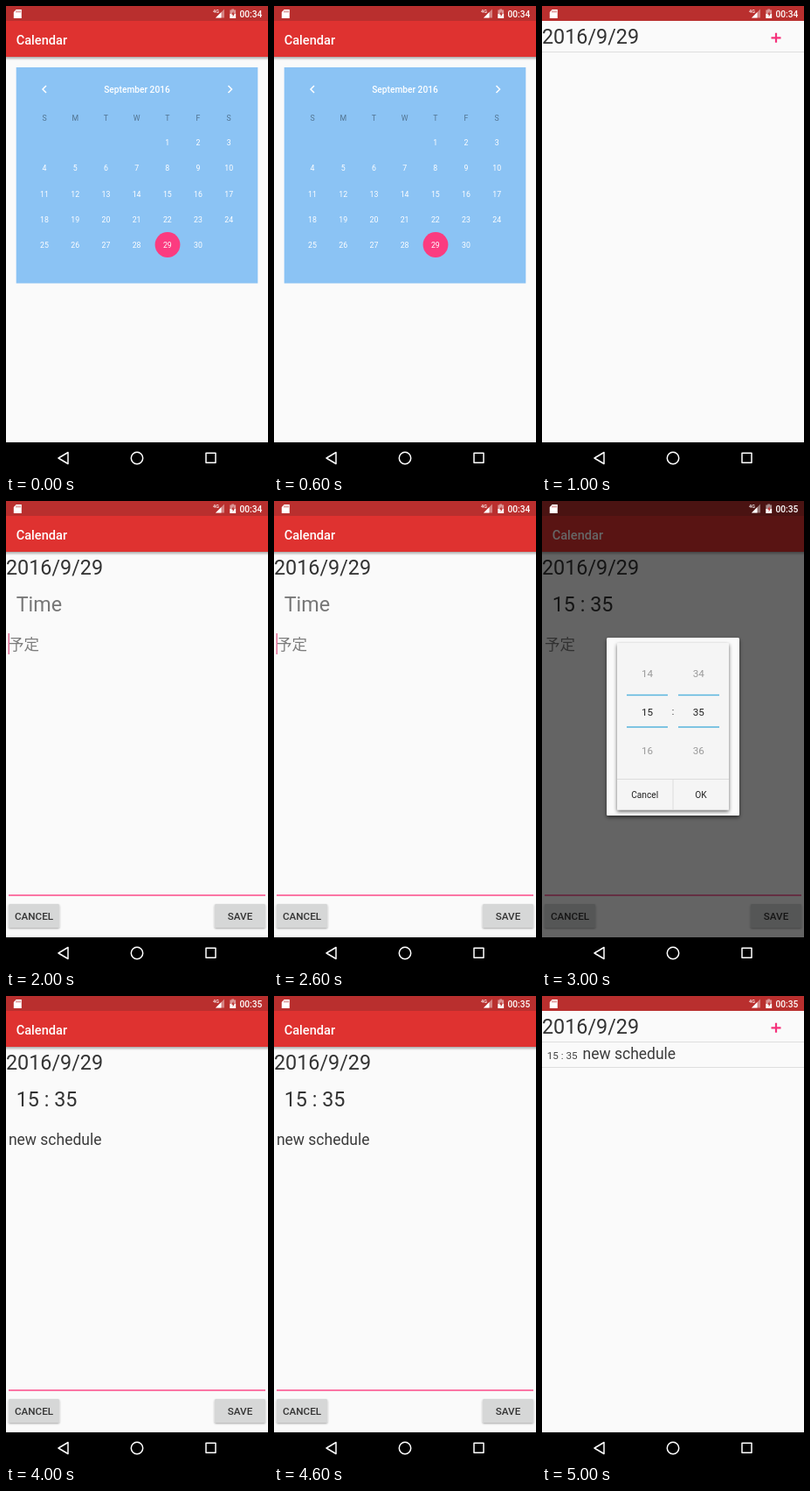
An HTML page for the animation above (6000 ms loop, 300x533 px).

```html
<!DOCTYPE html>
<html lang="en">
<head>
<meta charset="utf-8">
<title>Calendar</title>
<style>
  html, body { margin: 0; width: 100%; height: 100%; overflow: hidden; background: #fafafa; }
  svg { display: block; width: 100%; height: 100%; font-family: Roboto, "Noto Sans CJK JP", "Noto Sans CJK", sans-serif; }
  .medium { font-weight: 500; }
  .middle { text-anchor: middle; }
  .large { font-size: 23.33px; fill: #333; }
  .note { font-size: 17.5px; fill: #3c3c3c; }
  .line { fill: none; stroke: #fff; stroke-width: 1.5; }
</style>
</head>
<body>
<svg viewBox="0 0 300 533">
  <defs>
    <linearGradient id="fade" x2="0" y2="1">
      <stop stop-color="#000" stop-opacity=".32"/>
      <stop offset="1" stop-color="#000" stop-opacity="0"/>
    </linearGradient>
    <filter id="buttonShadow" x="-10%" y="-20%" width="120%" height="150%">
      <feDropShadow dx="0" dy="1" stdDeviation=".8" flood-opacity=".35"/>
    </filter>
    <filter id="dialogShadow" x="-10%" y="-10%" width="120%" height="125%">
      <feDropShadow dx="0" dy="2" stdDeviation="2" flood-opacity=".6"/>
    </filter>
  </defs>

  <rect width="300" height="533" fill="#fafafa"/>
  <rect width="300" height="17" fill="#b92f2e"/>

  <g data-steps="0234">
    <rect y="17" width="300" height="41" fill="#df3230"/>
    <rect y="58" width="300" height="4" fill="url(#fade)"/>
    <text x="11.7" y="43.5" class="medium" font-size="14.58" fill="#fff">Calendar</text>
  </g>

  <g id="month" data-steps="0">
    <rect x="11.7" y="70" width="276.6" height="246.5" fill="#8bc3f4"/>
    <path class="line" d="M46 91l-4 4 4 4M254.500 91l4 4-4 4"/>
    <text x="150" y="98.500" class="medium middle" font-size="10.2" fill="#fff">September 2016</text>
    <circle cx="185" cy="272.500" r="14.400" fill="#fb3c80"/>
  </g>

  <g data-steps="15">
    <text x="0" y="42.500" class="large">2016/9/29</text>
    <path d="M268 30.800v11M262.500 36.300h11" stroke="#f5317a" stroke-width="2.200"/>
    <path d="M0 52.500h300" stroke="#dedede"/>
  </g>
  <g data-steps="5">
    <text x="5.8" y="72" font-size="11.67" fill="#444">15 : 35</text>
    <text x="46.500" y="72" class="note">new schedule</text>
    <path d="M0 81.500h300" stroke="#dedede"/>
  </g>

  <g data-steps="234">
    <text x="0" y="83.500" class="large">2016/9/29</text>
    <path d="M3 450h294" stroke="#fb4a88" stroke-width="1.500"/>
    <g filter="url(#buttonShadow)" fill="#d6d7d7">
      <rect x="2.900" y="460" width="58.300" height="27" rx="1.500"/>
      <rect x="238.800" y="460" width="58.300" height="27" rx="1.500"/>
    </g>
    <g class="medium middle" font-size="11.67" fill="#333">
      <text x="32" y="478">CANCEL</text>
      <text x="268" y="478">SAVE</text>
    </g>
  </g>
  <text data-steps="2" x="11.7" y="126" class="large" style="fill:#777">Time</text>
  <text data-steps="34" x="11.7" y="126" class="large">15 : 35</text>
  <text data-steps="23" x="2.9" y="169.500" class="note" style="fill:#7c7c7c">予定</text>
  <path data-steps="2" d="M3.200 151v24" stroke="#d94a7c" stroke-width="1.200"/>
  <text data-steps="4" x="2.900" y="169.500" class="note">new schedule</text>

  <g data-steps="3">
    <rect width="300" height="498" opacity=".6"/>
    <rect x="74" y="156" width="152" height="203" rx="1.500" fill="#fafafa" filter="url(#dialogShadow)"/>
    <rect x="86" y="162" width="128" height="190.500" rx="1" fill="#f5f5f5" filter="url(#dialogShadow)"/>
    <g id="picker" class="middle" font-size="11.67"></g>
    <path d="M97 221.500h47M156 221.500h47M97 258h47M156 258h47" stroke="#58b5dd" stroke-width="1.400"/>
    <path d="M86 317.500h128M150 318v34" stroke="#dcdcdc"/>
    <g class="middle" font-size="10.2" fill="#222">
      <text x="150" y="244">:</text>
      <text x="117.700" y="339">Cancel</text>
      <text x="182" y="339">OK</text>
    </g>
  </g>

  <g fill="#fff">
    <path d="M11.600 4H17.800V14H8.800V7Z"/>
    <path d="M12 5.300v2.200M14 5.300v2.200M16 5.300v2.200" stroke="#b92f2e" stroke-width=".8"/>
    <text x="237" y="8" class="medium" font-size="5.500">4G</text>
    <path d="M250 3.500v10h-10z" opacity=".4"/>
    <path d="M246.500 7v6.500h-6.500z"/>
    <path d="M258.300 3.500h2.800v1h2v9.500h-6.700V4.500h1.900z" opacity=".5"/>
    <path d="M256.400 9h6.700v5h-6.700z"/>
    <path d="M260.500 6l-2.300 3.700h1.500v2.800l2.200-4h-1.400z" fill="#b92f2e"/>
    <text id="clock" x="267.500" y="13" class="medium" font-size="10.2"></text>
  </g>

  <rect y="498" width="300" height="35"/>
  <path class="line" d="M60 516l11-6.500v13zM229 510.300h11v11h-11z" stroke-linejoin="round"/>
  <circle class="line" cx="150" cy="516" r="6.700"/>
</svg>
<script>
  const STEP = 1000, STEPS = 6;
  const clock = document.getElementById("clock");
  const parts = document.querySelectorAll("[data-steps]");

  function addText(parentId, x, y, content, attributes) {
    const node = document.createElementNS("http://www.w3.org/2000/svg", "text");
    for (const [name, value] of Object.entries({ x, y, ...attributes })) node.setAttribute(name, value);
    node.textContent = content;
    document.getElementById(parentId).append(node);
  }

  const columnX = column => 44 + column * 35.2;
  const cell = { class: "middle", "font-size": 8.75 };
  [..."SMTWTFS"].forEach((day, i) => addText("month", columnX(i), 131.3, day, { ...cell, fill: "#527491" }));
  for (let day = 1; day <= 30; day++) {
    const slot = day + 3; // the month starts on a Thursday
    addText("month", columnX(slot % 7), 159.2 + Math.floor(slot / 7) * 29.17, day, { ...cell, fill: "#fff" });
  }

  for (const offset of [-1, 0, 1]) {
    const y = 244.5 + offset * 44, fill = offset ? "#999" : "#222";
    addText("picker", 120.6, y, 15 + offset, { fill });
    addText("picker", 179.3, y, 35 + offset, { fill });
  }

  let shown = -1;
  function draw() {
    const step = Math.floor((performance.now() - start) / STEP) % STEPS;
    if (step !== shown) {
      shown = step;
      for (const part of parts) part.style.display = part.dataset.steps.includes(step) ? "" : "none";
      clock.textContent = step < 3 ? "00:34" : "00:35";
    }
    requestAnimationFrame(draw);
  }
  const start = performance.now();
  draw();
</script>
</body>
</html>
```
